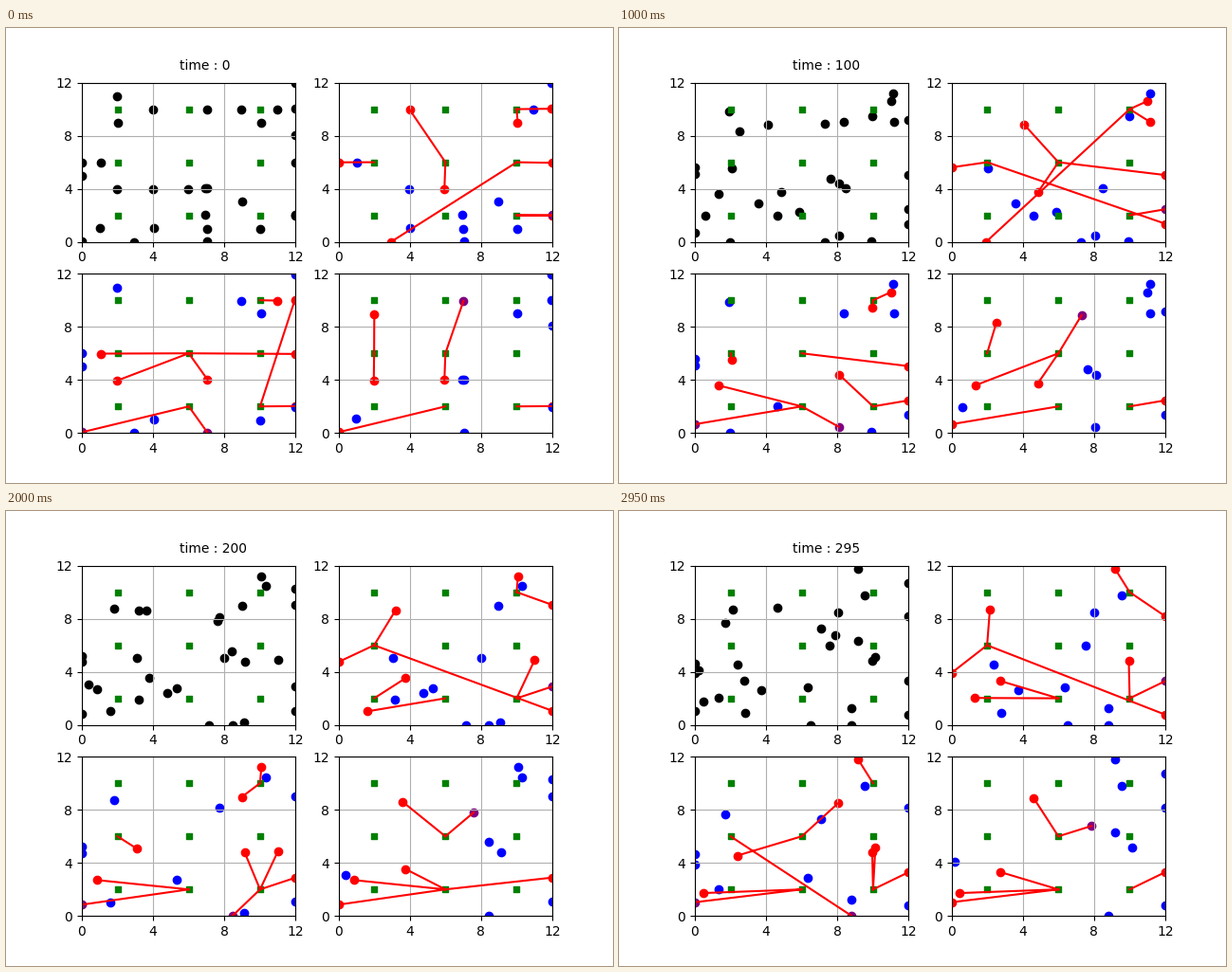
A matplotlib script that plays this animation: 640 by 480 pixels, repeating every 3 s.

```python
import numpy as np
import matplotlib.pyplot as plt
from matplotlib.animation import FuncAnimation

FRAMES, STEP, SIZE = 60, 5, 12
SPEED = 0.0111  # grid units per time unit, shared by all walkers
STATIONS = [(x, y) for y in (2, 6, 10) for x in (2, 6, 10)]


def value_at(now, first, changes):
    """Latest value among (time, value) changes, or the first one."""
    return [first, *(v for t, v in changes if now >= t)][-1]


def walk(x, y, heading, *turns):
    """Steady walk along a heading in degrees, sliding along the walls."""
    pos, track = np.array([x, y], float), []
    for frame in range(FRAMES):
        angle = np.radians(value_at(frame * STEP, heading, turns))
        pos = pos + SPEED * STEP * np.array([np.cos(angle), np.sin(angle)])
        pos = pos.clip(0, SIZE)
        track.append(pos)
    return track


def hop(first, *changes):
    """Index of the station in use over time."""
    return lambda now: value_at(now, first, changes)


walkers = dict(
    A=walk(2, 11, -95),
    B=walk(2, 9, -79, (66, 14)),
    C=walk(4, 10, -86, (122, 178)),
    D=walk(7, 10, -75),
    E=walk(9, 10, -125),
    F=walk(12, 12, -138),
    G=walk(12, 10, 148),
    H=walk(11, 10, -153),
    I=walk(10, 9, 1, (212, -66)),
    J=walk(12, 8, 88, (225, 15)),
    K=walk(12, 6, -56, (112, -176)),
    L=walk(12, 2, 23),
    M=walk(12, 2, -34, (100, -16)),
    N=walk(0, 6, -174, (68, -128)),
    O=walk(0, 5, 175, (230, -130)),
    P=walk(1, 6, -24, (215, -149)),
    Q=walk(2, 4, -109, (58, 155), (115, -112)),
    R=walk(4, 4, -111),
    S=walk(6, 4, -168),
    T=walk(7, 4, 169, (10, 45)),
    U=walk(7, 4, 20),
    V=walk(9, 3, 116),
    W=walk(7, 2, 169),
    X=walk(4, 1, 58, (185, 5)),
    Y=walk(1, 1, 98, (70, 162), (95, 101)),
    Z=walk(0, 0, 84, (46, 170)),
    a=walk(3, 0, -155, (107, 106)),
    b=walk(7, 1, -76, (172, -175), (225, -120)),
    c=walk(7, 0, 24, (102, -70)),
    d=walk(10, 1, -72, (68, -150), (185, 105)),
)

# per view: walkers by dot colour, and the station each linked one uses
views = [
    dict(dots=dict(black="".join(walkers)), links={}),
    dict(dots=dict(red="NCSaIGKM", blue="PRXWbcVdHF", purple="L"),
         links=dict(N=hop(3), I=hop(8), G=hop(8), L=hop(2),
                    C=hop(4, (160, 3)),
                    S=hop(4, (120, 1), (200, 0), (260, 1)),
                    a=hop(5, (35, 8), (160, 1)),
                    K=hop(5, (35, 2), (85, 4), (120, 2)),
                    M=hop(2, (85, 3)))),
    dict(dots=dict(red="PQUHGKL", blue="ANOXaEIFdM", purple="Zc"),
         links=dict(Z=hop(1), L=hop(2),
                    P=hop(4, (35, 3), (260, 4)),
                    Q=hop(4, (35, 1)),
                    U=hop(4, (35, 1), (85, 2)),
                    c=hop(1, (120, 2), (160, 4), (200, 2), (260, 3)),
                    H=hop(8, (260, 4)),
                    G=hop(2, (35, 8)),
                    K=hop(4, (35, 2), (85, 4), (120, 2)))),
    dict(dots=dict(red="BQSZL", blue="YTUcIFGJM", purple="D"),
         links=dict(D=hop(4), Z=hop(1),
                    B=hop(3, (160, 4)),
                    Q=hop(3, (35, 1), (85, 4), (160, 1)),
                    S=hop(4, (35, 1), (85, 4), (120, 1)),
                    L=hop(2, (160, 1), (260, 2)))),
]

fig, axes = plt.subplots(2, 2, figsize=(6.4, 4.8), dpi=100)
label = axes[0, 0].text(5.5, 13, "")
ticks = range(0, SIZE + 1, 4)
for ax, view in zip(axes.flat, views):
    ax.set(xlim=(0, SIZE), ylim=(0, SIZE), xticks=ticks, yticks=ticks)
    ax.grid()
    view["marks"] = [(ax.scatter([], [], c=color), names)
                     for color, names in view["dots"].items()]
    ax.scatter(*zip(*STATIONS), c="green", marker="s", s=20)
    view["line"], = ax.plot([], [], "r-")


def draw(frame):
    now = frame * STEP
    label.set_text(f"time : {now}")
    pos = {name: track[frame] for name, track in walkers.items()}
    for view in views:
        for mark, names in view["marks"]:
            mark.set_offsets([pos[n] for n in names])
        pts = [p for n, station in view["links"].items()
               for p in (pos[n], STATIONS[station(now)], (np.nan, np.nan))]
        if pts:
            view["line"].set_data(*zip(*pts))


anim = FuncAnimation(fig, draw, frames=FRAMES, interval=50,
                     init_func=lambda: draw(0), repeat=True, repeat_delay=0)
plt.show()
```
